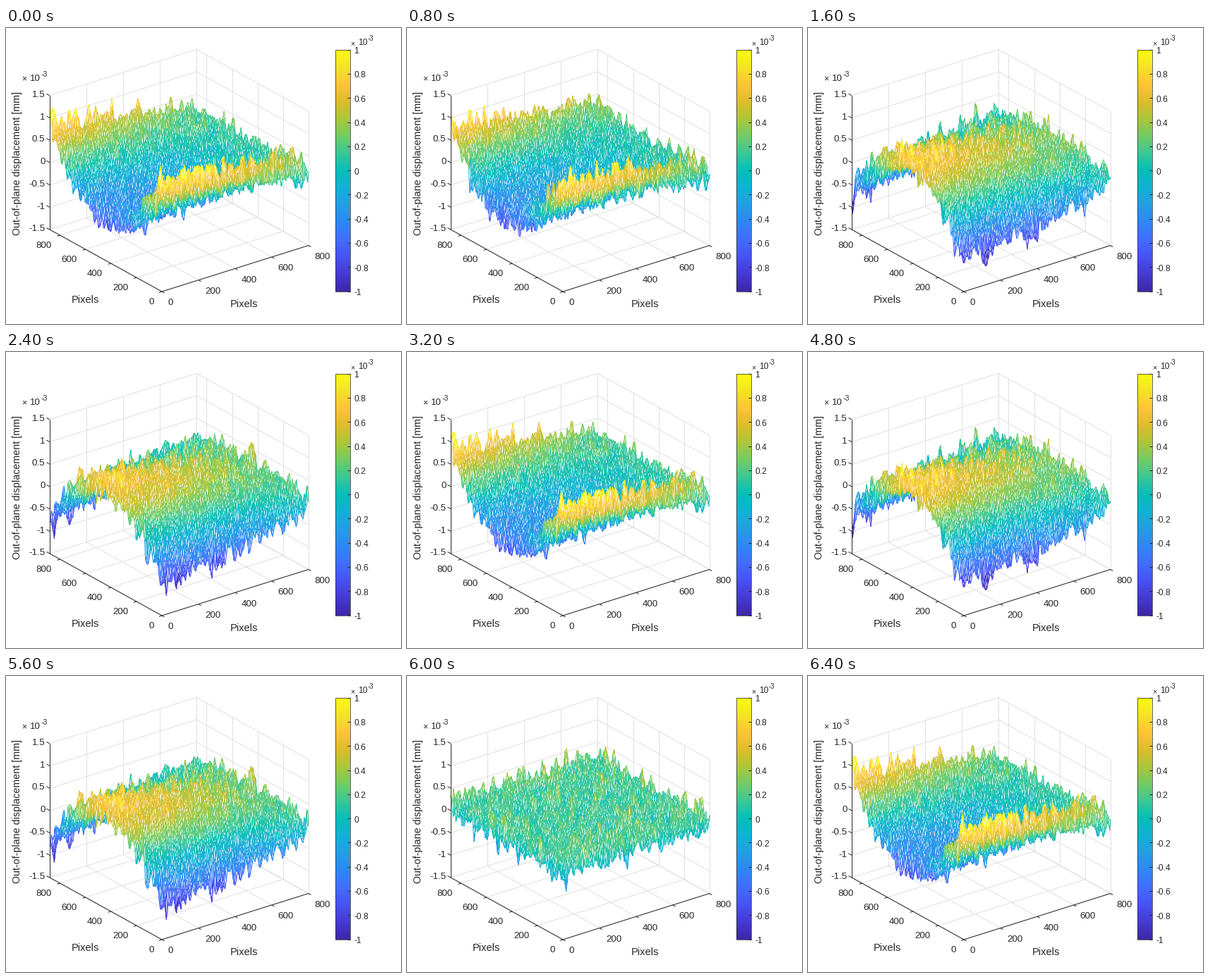
A matplotlib script that plays this animation: 560 by 420 pixels, repeating every 6800 ms.

```python
import numpy as np
import matplotlib.pyplot as plt
from matplotlib.animation import FuncAnimation
from matplotlib.collections import PolyCollection
from matplotlib.colors import LinearSegmentedColormap
from matplotlib.patches import Rectangle

W, H, DPI = 560, 420, 100
PX = 72 / DPI                 # one pixel in points
X_MAX, Y_MAX = 801, 880
N = 130                       # mesh cells per side
PERIOD = 8                    # frames per vibration cycle
INK, GRID = "#262626", "#dcdcdc"

PARULA = LinearSegmentedColormap.from_list("parula", [
    (.2422, .1504, .6603), (.2737, .2260, .8300), (.2810, .3228, .9579),
    (.2630, .4260, .9950), (.1786, .5289, .9682), (.1380, .6190, .9000),
    (.0689, .6948, .8394), (.0200, .7457, .7258), (.2161, .7843, .5923),
    (.4420, .8000, .4000), (.6720, .7793, .2227), (.8634, .7406, .1596),
    (.9970, .7659, .2199), (.9610, .8850, .1550), (.9769, .9839, .0805)])

plt.rcParams["font.family"] = "Liberation Sans"
fig = plt.figure(figsize=(W / DPI, H / DPI), dpi=DPI, facecolor="white")
ax = fig.add_axes([0, 0, 1, 1])
ax.set_xlim(0, W)
ax.set_ylim(H, 0)
ax.axis("off")


def project(x, y, z):
    """Unit x and y, z in 1e-3 mm, to stage pixels."""
    sx = 221 + 208 * x - 159 * y
    sy = 374 - 65.5 * x - 88 * y - 63.4 * (z + 1.5)
    return sx, sy


def line(a, b, color=GRID, width=0.9, zorder=1):
    ax.plot([a[0], b[0]], [a[1], b[1]], color=color, lw=width * PX,
            zorder=zorder, solid_capstyle="butt")


def text(x, y, s, size=13.33, ha="left"):
    ax.text(x, y + 0.36 * size, s, fontsize=size * PX, ha=ha,
            va="baseline", color=INK, zorder=5)


def tick(p, dx, dy):
    line(p, (p[0] + dx, p[1] + dy), INK, 1, 4)


def exponent(x, y, size):
    text(x, y + 1, "×", size * 0.9)
    text(x + 0.9 * size, y, "10", size)
    text(x + 2.05 * size, y - 5, "-3", size * 0.8)


def draw_axes():
    for v in (0, 200, 400, 600, 800):
        u, w = v / X_MAX, v / Y_MAX
        line(project(u, 0, -1.5), project(u, 1, -1.5))
        line(project(u, 1, -1.5), project(u, 1, 1.5))
        line(project(0, w, -1.5), project(1, w, -1.5))
        line(project(1, w, -1.5), project(1, w, 1.5))
        px, py = project(u, 0, -1.5), project(0, w, -1.5)
        tick(px, 3.6, 2)
        tick(py, -4, 1.3)
        text(px[0] + 9, px[1] + 14.5, str(v))
        text(py[0] - 11.5, py[1] + 13, str(v), ha="right")
    for z in np.arange(-1.5, 1.6, 0.5):
        line(project(0, 1, z), project(1, 1, z))
        line(project(1, 1, z), project(1, 0, z))
        p = project(0, 1, z)
        tick(p, -4.5, -2.4)
        text(p[0] - 6.5, p[1] - 2.5, f"{z:g}", ha="right")

    front = project(0, 0, -1.5)
    left = project(0, 1, -1.5)
    line(front, project(1, 0, -1.5), INK, 1, 4)
    line(front, left, INK, 1, 4)
    line(left, project(0, 1, 1.5), INK, 1, 4)

    exponent(22, 70, 13.33)
    text(112.5, 385, "Pixels", 14.67, "center")
    text(337.5, 390.5, "Pixels", 14.67, "center")
    ax.text(20, 192.5, "Out-of-plane displacement [mm]", rotation=90,
            rotation_mode="anchor", ha="center", va="baseline",
            fontsize=14.3 * PX, color=INK)


def draw_colorbar():
    x0, x1, y0, y1 = 467, 487.5, 30.8, 373.6
    ramp = np.linspace(1, 0, 256)[:, None]
    ax.imshow(ramp, cmap=PARULA, extent=(x0, x1, y1, y0), aspect="auto",
              interpolation="nearest", zorder=2)
    ax.set_xlim(0, W)
    ax.set_ylim(H, 0)
    ax.add_patch(Rectangle((x0, y0), x1 - x0, y1 - y0, fill=False,
                           ec=INK, lw=0.7 * PX, zorder=4))
    for i in range(11):
        y = y1 - (y1 - y0) * i / 10
        tick((x1, y), -3.5, 0)
        text(493, y + 1, f"{(i - 5) / 5:g}", 12)
    exponent(488, 20, 12)


def smooth(a):
    for axis in (0, 1):
        a = (np.roll(a, 1, axis) + 2 * a + np.roll(a, -1, axis)) / 4
    return a


grid = np.linspace(0, 1, N + 1)
gx, gy = np.meshgrid(grid, grid)
bend = 1.7 * np.abs(2 * gy - 1) ** 2.1 - 0.7
mode = (1 - 0.9 * gx ** (1.5 - 0.85 * gy)) * bend
rim = np.max(np.abs(np.stack([gx, gy]) * 2 - 1), axis=0) ** 12
# quads are painted from the back of the box to the front
order = np.argsort(-(66 * gx + 88 * gy)[:-1, :-1].ravel(), kind="stable")


def corners(a):
    quads = [a[:-1, :-1], a[:-1, 1:], a[1:, 1:], a[1:, :-1]]
    return np.stack([q.ravel() for q in quads], axis=1)[order]


def heights(k):
    noise = smooth(np.random.default_rng(40 + k).normal(size=gx.shape))
    noise *= (0.13 + 0.04 * rim) / noise.std()
    swing = 1.2 * np.cos(2 * np.pi * k / PERIOD - 0.75)
    return 0.07 + swing * mode + noise


draw_axes()
draw_colorbar()
mesh = PolyCollection([], facecolors="white", linewidths=PX, zorder=3)
ax.add_collection(mesh, autolim=False)


def update(frame):
    z = heights(frame % PERIOD)
    sx, sy = project(gx, gy, z)
    mesh.set_verts(np.stack([corners(sx), corners(sy)], axis=2))
    mesh.set_edgecolor(PARULA((corners(z).mean(axis=1) + 1) / 2))
    return [mesh]


anim = FuncAnimation(fig, update, frames=17, interval=400, repeat=True,
                     init_func=lambda: update(0))
plt.show()
```
